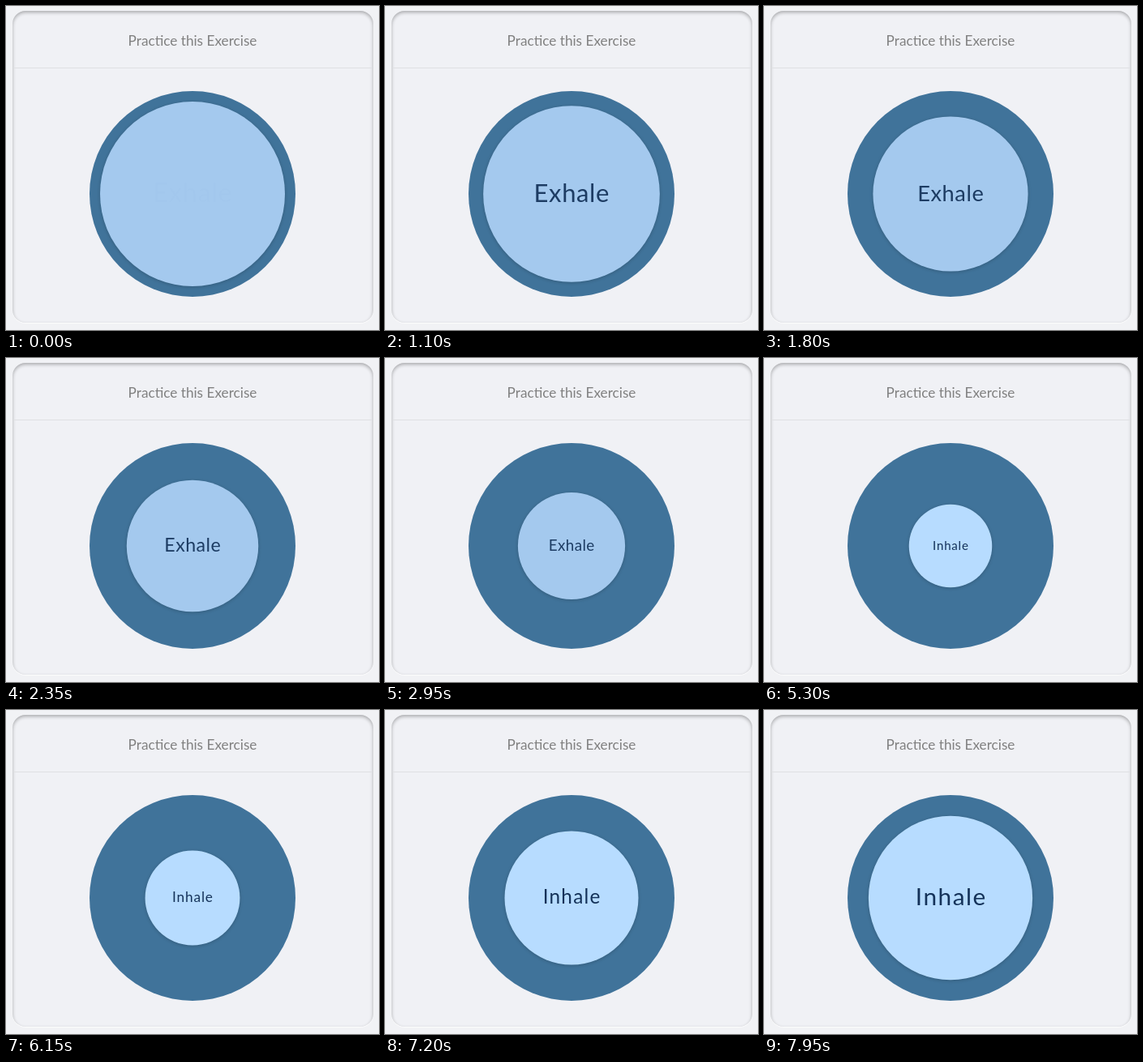
An HTML page with a canvas for the animation above (8000 ms loop, 460x400 px).

```html
<!DOCTYPE html>
<html lang="en">
<head>
<meta charset="utf-8">
<title>Breathing exercise</title>
<style>
  html, body { margin: 0; width: 100%; height: 100%; overflow: hidden; background: #f1f2f5; }
  .card {
    position: absolute; left: 8px; top: 6px; width: 445px; height: 385px;
    border-radius: 16px; background: #f0f1f5;
    box-shadow: inset 0 2px 4px rgba(0, 0, 0, .3), 0 1px 1px rgba(255, 255, 255, .8);
  }
  canvas { position: absolute; left: 0; top: 0; }
</style>
</head>
<body>
<div class="card"></div>
<canvas id="stage" width="460" height="400"></canvas>
<script>
const ctx = document.getElementById('stage').getContext('2d');
const LOOP = 8000;
const CENTER = { x: 230, y: 232 };
const RING = 127, LARGE = 114, SMALL = 51.2;
const BREATH = 4000, SHRINK_AT = 300, GROW_AT = 5205;
const EXHALE = { word: 'Exhale', size: 0.285, spacing: 0.02, ink: '#1d3c63' };
const INHALE = { word: 'Inhale', size: 0.295, spacing: 0.05, ink: '#143259' };

const clamp = v => Math.min(1, Math.max(0, v));
const progress = (t, start, length) => clamp((t - start) / length);
const mix = (a, b, k) => a + (b - a) * k;

// cubic-bezier(.42, 0, .58, 1), solved by bisection
function easeInOut(x) {
  let low = 0, high = 1;
  for (let i = 0; i < 20; i++) {
    const s = (low + high) / 2, r = 1 - s;
    const at = 1.26 * s * r * r + 1.74 * s * s * r + s * s * s;
    if (at < x) low = s; else high = s;
  }
  return low * low * (3 - 2 * low);
}

function radiusAt(t) {
  const out = easeInOut(progress(t, SHRINK_AT, BREATH));
  const back = easeInOut(progress(t, GROW_AT, BREATH));
  return mix(LARGE, SMALL, out - back);
}

function fillAt(t) {
  const k = progress(t, 4630, 270);
  const from = [164, 201, 238], to = [183, 220, 255];
  return `rgb(${from.map((c, i) => Math.round(mix(c, to[i], k))).join(',')})`;
}

function disc(radius, color) {
  ctx.fillStyle = color;
  ctx.beginPath();
  ctx.arc(CENTER.x, CENTER.y, radius, 0, Math.PI * 2);
  ctx.fill();
}

function text(words, y, size, color, spacing = 0) {
  ctx.font = `${size}px Lato, "Open Sans", sans-serif`;
  ctx.letterSpacing = `${spacing}px`;
  ctx.textAlign = 'center';
  ctx.fillStyle = color;
  ctx.fillText(words, CENTER.x + spacing / 2, y);
}

function label(style, radius, alpha) {
  ctx.globalAlpha = alpha;
  const size = radius * style.size;
  text(style.word, CENTER.y + radius * 0.09, size, style.ink, size * style.spacing);
  ctx.globalAlpha = 1;
}

function draw(t) {
  const radius = radiusAt(t);
  ctx.clearRect(0, 0, 460, 400);

  text('Practice this Exercise', 49, 17.2, '#808080');
  ctx.fillStyle = '#dfe0e3';
  ctx.fillRect(9, 76, 443, 1);

  disc(RING, '#40739a');
  ctx.save();
  ctx.shadowColor = 'rgba(0, 0, 0, .2)';
  ctx.shadowBlur = 4;
  ctx.shadowOffsetY = 1;
  disc(radius, fillAt(t));
  ctx.restore();

  if (t < 4500) label(EXHALE, radius, progress(t, 0, 150));
  else label(INHALE, radius, progress(t, 4900, 150));
}

function frame() {
  draw(performance.now() % LOOP);
  requestAnimationFrame(frame);
}
frame();
</script>
</body>
</html>
```
